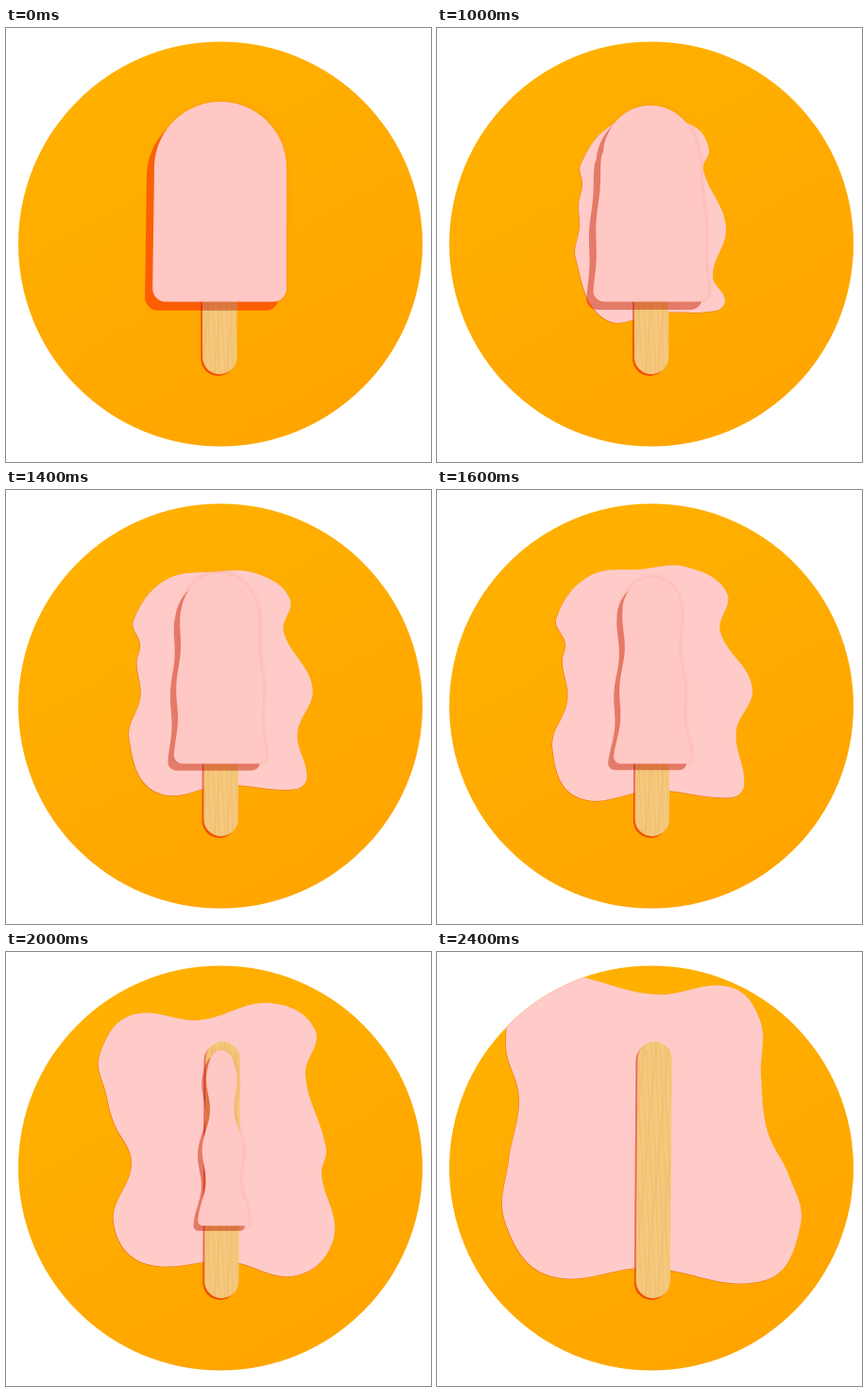
An HTML page with a canvas for the animation above (2.8 s loop, 450 px wide and 459 px high).

```html
<!DOCTYPE html>
<html lang="en">
<head>
<meta charset="utf-8">
<title>Melting ice pop</title>
<style>
html, body { margin: 0; width: 100%; height: 100%; overflow: hidden; background: #fff; }
canvas { display: block; }
</style>
</head>
<body>
<canvas id="stage" width="450" height="459"></canvas>
<script>
const ctx = document.getElementById('stage').getContext('2d');
const LOOP = 2800, HOLD = 600, STEP = 200, LAST = 10;
const BASE = 289.5, CX = 226, CY = 200;

// Ice: top y, shoulders (left, right), foot (left, right), flare power, wobble.
const iceKeys = [
  { at: 0, v: [78, 157, 297, 155, 297, 1, 0] },
  { at: 1, v: [80, 160, 285, 156, 295, .7, 1.5] },
  { at: 3, v: [82, 177, 275, 166, 287, .5, 1] },
  { at: 5, v: [88, 187, 265, 179, 274, .6, 1.5] },
  { at: 7, v: [97, 209, 249, 197, 264, 3, 2] },
  { at: 8, v: [104, 216, 240, 206, 255, 1, 3] },
  { at: 9, v: [185, 217, 236, 212, 245, 1, 3] }
];

// Puddle: crests and dips as x, y pairs, clockwise from the top.
const poolKeys = [
  { at: 3, v: [222,92, 272,104, 288,128, 282,150, 306,210, 292,262, 305,288, 295,299,
    235,301, 178,308, 147,244, 151,210, 150,187, 154,165, 152,145, 180,106] },
  { at: 7, v: [215,81, 262,74, 313,102, 306,150, 343,208, 325,254, 332,320, 317,334,
    230,323, 140,331, 114,283, 134,226, 127,180, 130,162, 118,132, 155,86] },
  { at: 8, v: [205,72, 280,54, 327,82, 317,131, 339,208, 334,235, 347,302, 308,342,
    235,327, 146,329, 114,286, 133,223, 114,180, 106,150, 99,110, 132,67] },
  { at: 9, v: [232,45, 310,37, 342,72, 343,130, 350,190, 372,235, 385,288, 348,347,
    222,334, 118,342, 72,285, 76,220, 87,155, 73,95, 95,10, 156,27] }
];

function keyed(keys, at) {
  const j = keys.findIndex(k => k.at >= at);
  if (j < 0) return keys[keys.length - 1].v;
  if (j === 0) return keys[0].v;
  const a = keys[j - 1], b = keys[j], t = (at - a.at) / (b.at - a.at);
  return a.v.map((x, i) => x + (b.v[i] - x) * t);
}

// Domed column with wavy sides and rounded feet.
function icePath([top, sl, sr, fl, fr, power, wobble]) {
  const mid = (sl + sr) / 2, dome = (sr - sl) / 2, foot = (fr - fl) * .1;
  const edge = (y, from, to, dir) => {
    const d = Math.min(1, (y - top) / dome);
    const fall = Math.max(0, (y - top - dome) / (BASE - top - dome));
    const c = Math.max(0, 1 - (BASE - y) / foot);
    const wide = (from + (to - from) * fall ** power - mid) * Math.sqrt(1 - (1 - d) ** 2);
    const wave = wobble * d * Math.cos((y - 207) / 12);
    return mid + wide + dir * (wave - foot * (1 - Math.sqrt(1 - c * c)));
  };
  const left = [], right = [], n = 90;
  for (let i = 0; i <= n; i++) {
    const y = top + (BASE - top) * (1 - Math.cos(Math.PI * i / n)) / 2;
    right.push([edge(y, sr, fr, 1), y]);
    left.unshift([edge(y, sl, fl, -1), y]);
  }
  const p = new Path2D();
  right.concat(left).forEach(([x, y]) => p.lineTo(x, y));
  p.closePath();
  return p;
}

// Smooth closed curve through the points, scaled about the centre.
function poolPath(v, scale) {
  const n = v.length / 2;
  const at = i => {
    const k = (i + n) % n;
    return [CX + (v[2 * k] - CX) * scale, CY + (v[2 * k + 1] - CY) * scale];
  };
  const tangent = i => {
    const a = at(i - 1), b = at(i + 1), d = Math.hypot(b[0] - a[0], b[1] - a[1]);
    return [(b[0] - a[0]) / d, (b[1] - a[1]) / d];
  };
  const p = new Path2D();
  p.moveTo(...at(0));
  for (let i = 0; i < n; i++) {
    const a = at(i), b = at(i + 1), u = tangent(i), w = tangent(i + 1);
    const h = Math.hypot(b[0] - a[0], b[1] - a[1]) * .37;
    p.bezierCurveTo(a[0] + u[0] * h, a[1] + u[1] * h, b[0] - w[0] * h, b[1] - w[1] * h, ...b);
  }
  p.closePath();
  return p;
}

function woodPath(x1, y1, x2, y2, r) {
  const a = Math.atan2(y2 - y1, x2 - x1), q = Math.PI / 2, p = new Path2D();
  p.arc(x1, y1, r, a + q, a - q);
  p.arc(x2, y2, r, a - q, a + q);
  p.closePath();
  return p;
}

function makePose(i) {
  const ice = i < LAST ? keyed(iceKeys, i) : null;
  const drop = ice ? 3 + (ice[4] - ice[3]) / 28 : 0;
  return {
    ice: ice && icePath(ice),
    pool: i > 0 ? poolPath(keyed(poolKeys, i), Math.min(1, .89 + .04 * i)) : null,
    wood: woodPath(226 + i * .45, 113, 226.3 + i * .25, 348, 18.2),
    shade: [-drop, drop * 1.15]
  };
}
const poses = Array.from({ length: LAST + 1 }, (_, i) => makePose(i));

const disc = new Path2D();
disc.arc(227, 228.5, 214, 0, Math.PI * 2);

const ground = ctx.createLinearGradient(110, 20, 350, 440);
ground.addColorStop(0, '#ffb100');
ground.addColorStop(1, '#ffa400');

function shadow(path, [dx, dy], color, area) {
  ctx.save();
  if (area) ctx.clip(area);
  ctx.globalCompositeOperation = 'multiply';
  ctx.filter = 'blur(0.6px)';
  ctx.translate(dx, dy);
  ctx.fillStyle = color;
  ctx.fill(path);
  ctx.restore();
}

function paper(path, color, glow, blur) {
  ctx.save();
  ctx.shadowColor = glow;
  ctx.shadowBlur = blur;
  ctx.fillStyle = color;
  ctx.fill(path);
  ctx.restore();
}

function drawWood(path) {
  ctx.save();
  ctx.fillStyle = '#f5c87c';
  ctx.fill(path);
  ctx.clip(path);
  ctx.strokeStyle = 'rgba(215,150,70,.25)';
  ctx.lineWidth = .8;
  for (let i = 0; i < 12; i++) {
    ctx.beginPath();
    for (let y = 90; y < 370; y += 4) {
      ctx.lineTo(209 + i * 3.5 + Math.sin(y * .045 + i * 1.7) * 1.6, y);
    }
    ctx.stroke();
  }
  ctx.restore();
}

function draw({ ice, pool, wood, shade }) {
  ctx.fillStyle = '#fff';
  ctx.fillRect(0, 0, 450, 459);
  ctx.save();
  ctx.clip(disc);
  ctx.fillStyle = ground;
  ctx.fillRect(0, 0, 450, 459);
  if (ice) shadow(ice, shade, 'rgb(252,140,120)');
  if (pool) {
    shadow(pool, [-.5, .5], 'rgb(235,165,120)');
    paper(pool, '#ffcbc9', 'transparent', 0);
  }
  shadow(wood, [-1.8, 1.8], 'rgb(240,125,110)');
  drawWood(wood);
  if (ice) {
    shadow(ice, shade, 'rgb(228,155,135)', pool || wood);
    paper(ice, '#ffc8c5', 'rgba(240,100,50,.3)', 6);
  }
  ctx.restore();
}

const start = performance.now();
function tick() {
  const t = (performance.now() - start) % LOOP;
  const i = t < HOLD ? 0 : 1 + Math.floor((t - HOLD) / STEP);
  draw(poses[Math.min(i, LAST)]);
  requestAnimationFrame(tick);
}
tick();
</script>
</body>
</html>
```
